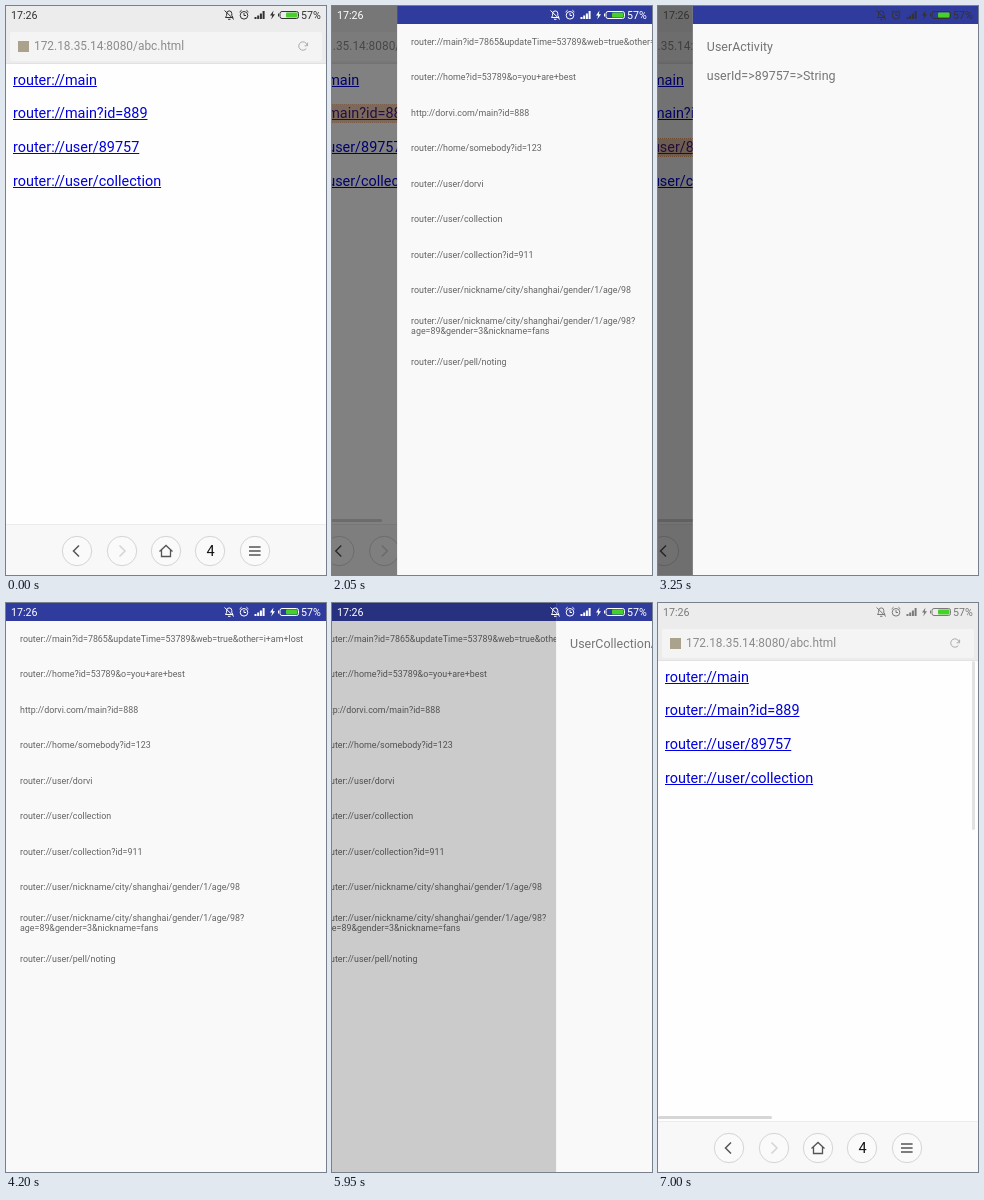
These frames come from a looping animation (320 by 569 pixels, 7050 ms). An HTML page:

```html
<!DOCTYPE html>
<html lang="en">
<head>
<meta charset="utf-8">
<style>
html, body { margin: 0; width: 100%; height: 100%; overflow: hidden; }
#stage { position: relative; width: 320px; height: 569px; overflow: hidden; background: #000; font-family: Roboto, sans-serif; }
.page, .page > *, svg { position: absolute; }
.page { left: 0; top: 0; width: 320px; height: 569px; background: #fefefe; white-space: nowrap; }
.app { background: #f9f9f9; }
.app::before { content: ""; position: absolute; width: 100%; height: 18px; background: #303c9d; }
svg { left: 0; top: 0; width: 320px; height: 569px; }
.top { width: 320px; height: 57px; background: #ececec; border-bottom: 1px solid #e2e2e2; }
.url { left: 4px; top: 26px; width: 288px; height: 29px; padding-left: 24px; background: #f4f4f4; border-radius: 2px; font-size: 11.88px; line-height: 29px; color: #8c8c8c; }
.link { left: 7px; font-size: 14.42px; line-height: 17px; color: #0000dc; text-decoration: underline; }
.link.hit { background: #f3d0b5; outline: 1px dotted #f0a070; color: #4a1a80; }
.nav { top: 518px; width: 320px; height: 50px; background: #f8f8f8; border-top: 1px solid #ececec; }
.bar { background: #d6d6d6; border-radius: 2px; }
.row { left: 14px; height: 35.56px; display: flex; align-items: center; font-size: 8.89px; line-height: 10.5px; color: #636363; white-space: pre; }
.line { left: 14px; font-size: 12.44px; line-height: 16px; color: #757575; }
</style>
</head>
<body>
<div id="stage">
  <div class="page" id="browser">
    <div class="top"></div>
    <div class="url">172.18.35.14:8080/abc.html</div>
    <div class="nav"></div>
    <div class="bar" id="hbar" style="left:0;top:513px;width:114px;height:3px"></div>
    <div class="bar" id="vbar" style="left:314px;top:58px;width:3px;height:169px"></div>
    <svg fill="none">
      <rect x="12" y="35" width="11" height="11" fill="#aaa28c"/>
      <path d="M300.4 42.4A4.2 4.2 0 1 1 301 39M301.6 36.6V39.8H298.6" stroke="#aaa"/>
      <g id="rings" fill="#fafafa" stroke="#d4d4d4"></g>
      <g stroke="#555" stroke-width="1.5">
        <path d="M73 539.5l-5.5 5.5 5.5 5.5"/>
        <path d="M113.5 539.5l5.5 5.5-5.5 5.5" stroke="#d4d4d4"/>
        <path d="M153.5 545.5l6.5-6 6.5 6M155.5 544v6.5h9v-6.5" stroke-width="1.3"/>
        <path d="M243 541h11.6M243 545h11.6M243 549h11.6"/>
      </g>
      <text x="204.5" y="550" text-anchor="middle" font-size="14.5" fill="#111">4</text>
    </svg>
  </div>
  <div class="page app" id="list"></div>
  <div class="page app" id="detail">
    <div class="line" id="title" style="top:33px"></div>
    <div class="line" id="extra" style="top:62px"></div>
  </div>
  <svg id="status" fill="none" stroke="currentColor">
    <g fill="currentColor" stroke="none" font-size="10.67">
      <text x="5" y="13">17:26</text>
      <text x="295" y="13">57%</text>
      <path d="M248.5 13h2v-2h-2zM251.2 13h2v-3.5h-2zM253.9 13h2v-5.5h-2zM256.6 13h2v-8h-2zM267.5 4.5l-3.5 5h2.2l-1 4 3.8-5.2h-2.2z"/>
    </g>
    <path d="M219.5 11.5h7.5l-1.2-2V7.5a2.6 2.6 0 0 0-5.2 0v2zM222 13.3h2.5M218.5 4.5l9.5 9"/>
    <circle cx="238" cy="9.3" r="3.8"/>
    <path d="M238 7v2.5h2M233.6 6l2-1.8M242.4 6l-2-1.8"/>
    <rect x="274" y="5.5" width="18.5" height="7" rx="2"/>
    <path d="M272.5 7.5v3"/>
    <rect x="280" y="6.5" width="11.5" height="5" rx="1" fill="#49cf2b" stroke="none"/>
  </svg>
</div>
<script>
const LOOP = 7050, SLIDE = 400, PRESS = 150, WIDTH = 320;
const $ = id => document.getElementById(id);
const clamp = v => Math.max(0, Math.min(1, v));
const glide = ms => 1 - (1 - clamp(ms / SLIDE)) ** 2;

const links = ['main', 'main?id=889', 'user/89757', 'user/collection'];
const routes = [
  'router://main?id=7865&updateTime=53789&web=true&other=i+am+lost',
  'router://home?id=53789&o=you+are+best',
  'http://dorvi.com/main?id=888',
  'router://home/somebody?id=123',
  'router://user/dorvi',
  'router://user/collection',
  'router://user/collection?id=911',
  'router://user/nickname/city/shanghai/gender/1/age/98',
  'router://user/nickname/city/shanghai/gender/1/age/98?\nage=89&gender=3&nickname=fans',
  'router://user/pell/noting'
];
// Each visit opens a screen, pops it to the list, then leaves to the browser.
const visits = [
  { link: 1, open: 700, pop: 1370, leave: 2008, release: 2408, title: 'MainActivity', extra: 'id=>889=>Long' },
  { link: 2, open: 2983, pop: 3600, leave: 4210, release: 4210, title: 'UserActivity', extra: 'userId=>89757=>String' },
  { link: 3, open: 5156, pop: 5770, leave: 6380, release: 6380, title: 'UserCollectionActivity', extra: '' }
];

function add(parent, className, text, top) {
  const el = document.createElement('div');
  el.className = className;
  el.textContent = text;
  el.style.top = top + 'px';
  return parent.appendChild(el);
}
const anchors = links.map((path, i) => add($('browser'), 'link', 'router://' + path, 65.5 + i * 33.8));
routes.forEach((route, i) => add($('list'), 'row', route, 18 + i * 35.56));
$('rings').innerHTML = [71, 116, 160, 204, 249].map(x => `<circle cx="${x}" cy="545" r="14.7"/>`).join('');

function place(id, x, cover = 0) {
  const style = $(id).style;
  style.visibility = x < WIDTH ? 'visible' : 'hidden';
  style.transform = `translateX(${x}px)`;
  style.filter = cover ? `brightness(${1 - 0.62 * cover})` : 'none';
}

function render(t) {
  const visit = visits.findLast(v => t >= v.open - PRESS);
  let browserX = 0, listX = WIDTH, detailX = WIDTH, browserCover = 0, listCover = 0, light = 0;
  if (visit) {
    const { open, pop, leave } = visit;
    if (t < pop) {
      browserCover = glide(t - open);
      browserX = -Math.min(65, 80 * browserCover ** 1.08);
      detailX = WIDTH * (1 - browserCover);
    } else if (t < leave) {
      listCover = 1 - glide(t - pop);
      listX = -80 * listCover;
      detailX = WIDTH * (1 - listCover);
    } else {
      browserCover = 1 - glide(t - leave);
      browserX = -80 * browserCover;
      listX = WIDTH * (1 - browserCover);
    }
    light = clamp((t - open - SLIDE) / 100) - clamp((t - leave - SLIDE) / 340);
    $('title').textContent = visit.title;
    $('extra').textContent = visit.extra;
  }
  place('browser', browserX, browserCover);
  place('list', listX, listCover);
  place('detail', detailX);
  anchors.forEach((a, i) => a.classList.toggle('hit', !!visit && i === visit.link && t < visit.release));
  $('hbar').style.opacity = visit ? 1 : 0;
  $('vbar').style.opacity = visit && t > visit.leave + SLIDE ? 0.7 : 0;
  const shade = 50 + 205 * light;
  $('status').style.color = `rgb(${shade},${shade},${shade})`;
}

function frame() {
  render(performance.now() % LOOP);
  requestAnimationFrame(frame);
}
frame();
</script>
</body>
</html>
```
